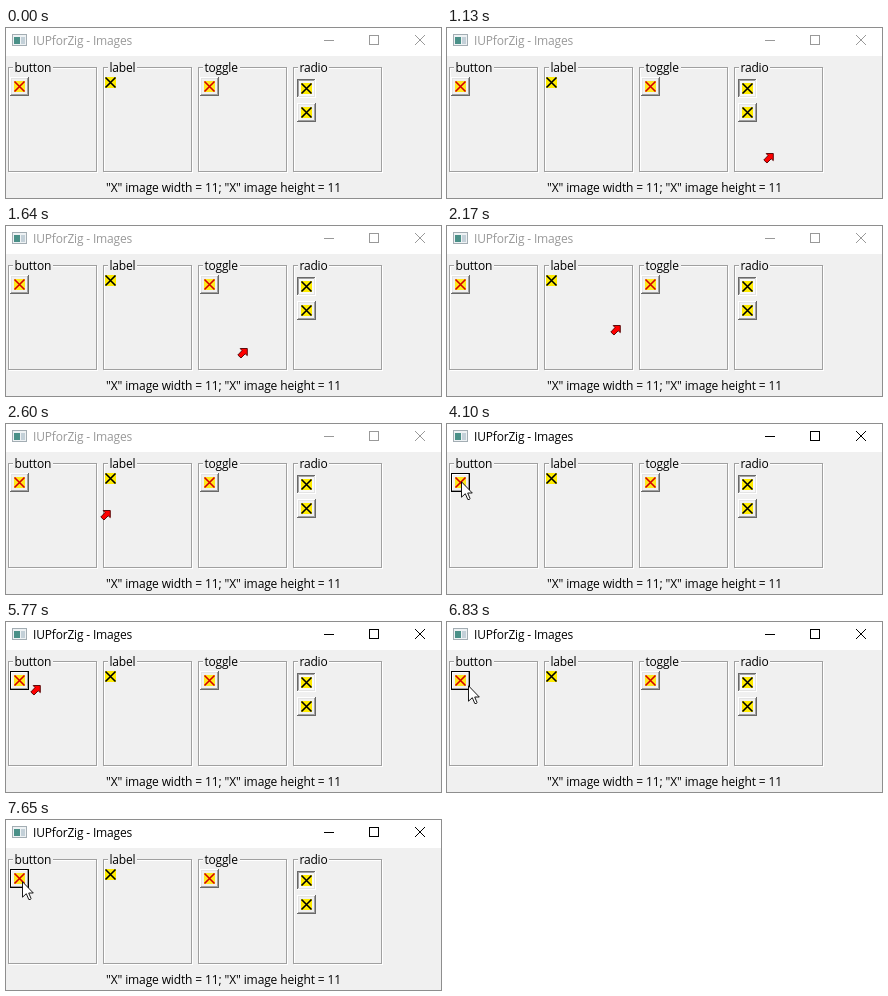
Animation, 435 px wide and 170 px high, one loop 8 s. Source, as an HTML page:

```html
<!DOCTYPE html>
<html lang="en">
<head>
<meta charset="utf-8">
<title>IUPforZig - Images</title>
<style>
html, body { margin: 0; width: 100%; height: 100%; overflow: hidden; background: #f0f0f0; }
svg { display: block; width: 435px; height: 170px; }
text { font: 12px "Open Sans", "Noto Sans", sans-serif; letter-spacing: -.2px; }
.crisp { shape-rendering: crispEdges; }
.line { fill: none; stroke-width: 1; }
#bar { --ink: #999; }
#bar.active { --ink: #000; }
#bar text { fill: var(--ink); letter-spacing: -.18px; }
#controls { stroke: var(--ink); }
#size { letter-spacing: -.13px; }
</style>
</head>
<body>
<svg viewBox="0 0 435 170">
  <defs>
    <g id="raised" class="line crisp"></g>
    <g id="sunken" class="line crisp"></g>
    <g id="focused" class="line crisp"></g>
    <g id="pressed" class="line crisp"></g>
    <path id="cross" d="M.5 .5L10.5 10.5M10.5 .5L.5 10.5" stroke-width="1.6"/>
    <g id="redX">
      <rect width="11" height="11" fill="#ffe81c"/>
      <use href="#cross" stroke="#d40000"/>
    </g>
    <g id="blackX">
      <rect width="11" height="11" fill="#ffec00"/>
      <use href="#cross" stroke="#000"/>
    </g>
  </defs>

  <rect width="435" height="170" fill="#f0f0f0"/>
  <g id="bar">
    <rect width="435" height="28" fill="#fff"/>
    <g class="crisp">
      <rect x="6.5" y="6.5" width="14" height="11" fill="#eef2f4" stroke="#a3adb3"/>
      <path fill="#4a9088" d="M8 9h6v7h-6z"/>
      <path fill="#c3d0d8" d="M15 9h4v7h-4z"/>
    </g>
    <text x="27" y="17">IUPforZig - Images</text>
    <g id="controls" class="line">
      <path class="crisp" d="M318 12.5h10M363.5 7.5h9v9h-9z"/>
      <path d="M409 7l10 10m0-10l-10 10"/>
    </g>
  </g>

  <g id="groups"></g>

  <g transform="translate(4 49)">
    <use id="edge" href="#raised"/>
    <use id="face" href="#redX" x="4" y="4"/>
  </g>
  <use href="#blackX" x="99" y="49"/>
  <use href="#raised" x="194" y="49"/>
  <use href="#redX" x="198" y="53"/>
  <use href="#sunken" x="291" y="51"/>
  <use href="#blackX" x="295" y="55"/>
  <use href="#raised" x="291" y="75"/>
  <use href="#blackX" x="295" y="79"/>

  <text id="size" x="100" y="164">"X" image width = 11; "X" image height = 11</text>

  <g id="cursor">
    <path id="red" fill="#f00" stroke="#500000" stroke-width=".9"
      d="M3.2 .5H10.3V7.6L8.2 5.8 4 10 .8 7 5 2.6Z"/>
    <path id="white" fill="#fff" stroke="#000" stroke-width=".9"
      d="M.5 .8V16.2L4.3 12.7 6.8 18.5H8.4L9 17.4 6.7 12H11.3Z"/>
  </g>
</svg>
<script>
const LOOP = 8000;
const TICK = 73;
const SIZE = 19;
const $ = id => document.getElementById(id);

// One ring of a button edge: upper left colour, lower right colour
function ring(inset, light, dark) {
  const a = inset + .5, b = SIZE - inset - .5;
  return `<path stroke="${light}" d="M${a} ${b}V${a}H${b}"/>
    <path stroke="${dark}" d="M${a - .5} ${b}H${b}V${a - .5}"/>`;
}
$("raised").innerHTML = ring(0, "#fff", "#696969") + ring(1, "#e3e3e3", "#a0a0a0");
$("sunken").innerHTML = `<rect width="${SIZE}" height="${SIZE}" fill="#f8f8f8"/>` +
  ring(0, "#696969", "#fff") + ring(1, "#a0a0a0", "#e3e3e3");
$("focused").innerHTML = ring(0, "#000", "#000") + ring(1, "#fff", "#a0a0a0");
$("pressed").innerHTML = ring(0, "#000", "#000") + ring(1, "#a0a0a0", "#a0a0a0");

["button", "label", "toggle", "radio"].forEach((name, i) => {
  const frame = (d, color) => `<rect class="line crisp" x="${d + .5}" y="${d + 39.5}"
    width="88" height="104" stroke="${color}"/>`;
  const g = document.createElementNS("http://www.w3.org/2000/svg", "g");
  g.setAttribute("transform", `translate(${2 + 95 * i} 0)`);
  g.innerHTML = frame(1, "#fff") + frame(0, "#a0a0a0") +
    `<rect class="crisp" x="5" y="38" height="4" fill="#f0f0f0"/><text x="6.5" y="44">${name}</text>`;
  $("groups").append(g);
  const width = g.querySelector("text").getComputedTextLength();
  g.querySelector("rect:last-of-type").setAttribute("width", Math.round(width + 3.5));
});

// Each move leads from the last place to x, y; out shapes the easing, sag bends the path
const moves = [
  { start: 530, end: 820, x: 331, y: 125, out: 1.2, sag: 0 },
  { start: 1130, end: 1640, x: 231, y: 122, out: 1.2, sag: 0 },
  { start: 1790, end: 2520, x: 120, y: 84, out: 1.2, sag: 0 },
  { start: 2600, end: 3340, x: 14, y: 57, out: 2.9, sag: 12 },
  { start: 5560, end: 5990, x: 31, y: 70, out: 1, sag: -1 },
  { start: 6370, end: 7050, x: 16, y: 61, out: .9, sag: -1.2 }
];
const presses = [[3710, 4100], [4940, 5250], [7340, 7650]];
const FOCUS = presses[0][0];

function pointer(t) {
  let at = { x: 332, y: 170 };
  for (const m of moves) {
    if (t < m.start) break;
    const last = Math.round((m.end - m.start) / TICK);
    const step = Math.min(last, Math.floor((t - m.start) / (m.end - m.start) * last + .1));
    const u = 1 - (1 - (step + 1) / (last + 1)) ** m.out;
    at = {
      x: at.x + (m.x - at.x) * u,
      y: at.y + (m.y - at.y) * u + m.sag * 4 * u * (1 - u)
    };
  }
  return { x: Math.round(at.x), y: Math.round(at.y) };
}

const show = (id, on) => $(id).setAttribute("visibility", on ? "visible" : "hidden");

function draw(t) {
  const { x, y } = pointer(t);
  const inside = x < 4 + SIZE && y < 49 + SIZE;
  show("red", !inside);
  show("white", inside);
  $("cursor").setAttribute("transform", `translate(${x} ${y})`);

  const active = t >= FOCUS;
  const down = presses.some(([a, b]) => t >= a && t < b);
  $("bar").classList.toggle("active", active);
  $("edge").setAttribute("href", down ? "#pressed" : active ? "#focused" : "#raised");
  $("face").setAttribute("transform", down ? "translate(1 1)" : "");
}

function tick() {
  draw(performance.now() % LOOP);
  requestAnimationFrame(tick);
}
tick();
</script>
</body>
</html>
```
